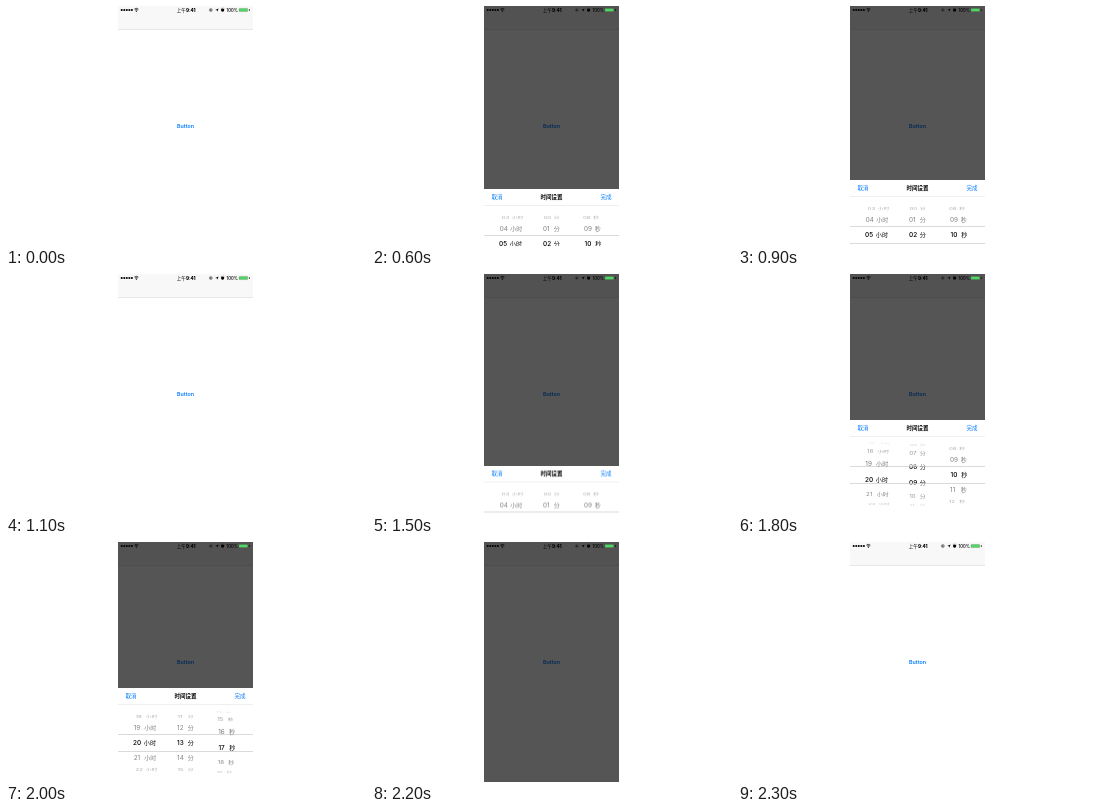
Animation, 360 px wide and 240 px high, one loop 2.4 s. Source, as an HTML page:

```html
<!DOCTYPE html>
<html lang="zh-CN">
<head>
<meta charset="utf-8">
<title>时间设置</title>
<style>
html, body { margin: 0; width: 100%; height: 100%; overflow: hidden; background: #fff; }
svg { display: block; width: 360px; height: 240px; }
text { font-family: Inter, "Noto Sans CJK SC", "Noto Sans CJK", sans-serif; }
.blue { fill: #007aff; }
.mid { text-anchor: middle; }
.bar { font-size: 5.5px; }
#dim { animation: dim 2400ms step-end infinite; }
#sheet { animation: slide 2400ms step-end infinite; }

@keyframes dim {
  0% { opacity: 0; }
  25% { opacity: .667; }
  45.8333% { opacity: 0; }
  62.5% { opacity: .667; }
  95.8333% { opacity: 0; }
}
@keyframes slide {
  0% { transform: translateY(240px); }
  25% { transform: translateY(183px); }
  29.1667% { transform: translateY(149px); }
  33.3333% { transform: translateY(146px); }
  37.5% { transform: translateY(174px); }
  41.6667% { transform: translateY(240px); }
  62.5% { transform: translateY(191.5px); }
  66.6667% { transform: translateY(150px); }
  70.8333% { transform: translateY(146px); }
  87.5% { transform: translateY(180px); }
  91.6667% { transform: translateY(240px); }
}
</style>
</head>
<body>
<svg viewBox="0 0 360 240">
  <defs>
    <clipPath id="screen"><rect x="112" width="135" height="240"/></clipPath>
    <clipPath id="band"><rect x="112" y="46.5" width="135" height="17"/></clipPath>
    <clipPath id="rest"><path d="M112 17h135v29.5h-135zM112 63.5h135v31h-135z"/></clipPath>
  </defs>
  <g clip-path="url(#screen)">
    <rect x="112" width="135" height="23" fill="#f8f8f8"/>
    <rect x="112" y="23" width="135" height=".5" fill="#d0d0d0"/>
    <text class="blue mid" x="179.5" y="122" font-size="5.3" font-weight="600">Button</text>
    <rect id="dim" x="112" width="135" height="240"/>

    <g id="status">
      <path d="M115.7 4h10.4" fill="none" stroke="#000" stroke-width="2.1" stroke-linecap="round" stroke-dasharray="0 2.55"/>
      <path d="M128.4 3.2q2-1.7 4 0M129.2 4.2q1.2-1 2.4 0" fill="none" stroke="#000" stroke-width=".8"/>
      <circle cx="130.4" cy="5.2" r=".6"/>
      <text x="170.7" y="5.7" font-size="4.6" font-weight="500">上午<tspan font-weight="800">9:41</tspan></text>
      <circle cx="204.8" cy="4" r="1.5" fill="none" stroke="#333" stroke-width=".5"/>
      <rect x="204.1" y="3.5" width="1.4" height="1.1"/>
      <path d="M212.6 2.4l-1.4 3.4-.3-1.6-1.7-.3z"/>
      <circle cx="216.6" cy="4.1" r="1.6"/>
      <path d="M214.9 2.8l.8-.7M218.3 2.8l-.8-.7" stroke="#000" stroke-width=".6"/>
      <text x="220.6" y="5.6" font-size="4.2" font-weight="500">100%</text>
      <rect x="233" y="2.4" width="8.7" height="3.2" rx=".5" fill="#4cd964" stroke="#555" stroke-width=".25"/>
      <rect x="242.9" y="3.2" width=".9" height="1.6" rx=".4"/>
    </g>

    <g id="sheet">
      <rect x="112" width="135" height="95" fill="#fff"/>
      <text class="blue bar" x="119.5" y="10">取消</text>
      <text class="bar mid" x="179.5" y="10" font-weight="700">时间设置</text>
      <text class="blue bar" x="228.5" y="10">完成</text>
      <rect x="112" y="16" width="135" height=".5" fill="#dedede"/>
      <g id="outer" clip-path="url(#rest)"></g>
      <g id="inner" clip-path="url(#band)" font-weight="500"></g>
      <path d="M112 46.5h135M112 63.5h135" stroke="#b4b4b4" stroke-width=".5"/>
    </g>
  </g>
</svg>
<script>
const LOOP = 2400, STEP = 100;
const MID_X = 179.5, MID_Y = 55, RADIUS = 32, ROW_ANGLE = 28 * Math.PI / 180;

// turns: wheel position at each step from 1700 ms on
const wheels = [
  { x: 127, unit: "小时", size: 24, rest: 5, turns: [13, 19.71, 20, 20] },
  { x: 171, unit: "分", size: 60, rest: 2, turns: [2.6, 8.5, 12.6, 13] },
  { x: 212.5, unit: "秒", size: 60, rest: 10, turns: [10, 10, 12.4, 16.7] }
];

function add(parent, tag, attrs) {
  const el = document.createElementNS("http://www.w3.org/2000/svg", tag);
  for (const key in attrs) el.setAttribute(key, attrs[key]);
  return parent.appendChild(el);
}

function makeRow(layer, wheel) {
  const group = add(layer, "g", {});
  const x = wheel.x - MID_X;
  const digits = add(group, "text", { x, y: 2.3, "font-size": 6.4 });
  add(group, "text", { x: x + 10.8, y: 2.3, "font-size": 6.1 }).textContent = wheel.unit;
  return { group, digits };
}

const layers = ["outer", "inner"].map(id => document.getElementById(id));
for (const wheel of wheels) {
  wheel.rows = layers.map(layer => Array.from({ length: 7 }, () => makeRow(layer, wheel)));
}

function turnWheel(wheel, turn) {
  const first = Math.round(turn) - 3;
  wheel.rows.forEach((rows, layer) => rows.forEach(({ group, digits }, i) => {
    const angle = (first + i - turn) * ROW_ANGLE;
    const cos = Math.cos(angle);
    const hidden = Math.abs(angle) > 1.45;
    group.setAttribute("display", hidden ? "none" : "inline");
    if (hidden) return;
    const scale = 1 - 0.11 * (1 - cos);
    const y = MID_Y + RADIUS * Math.sin(angle);
    group.setAttribute("transform", `translate(${MID_X} ${y}) scale(${scale} ${scale * cos})`);
    group.setAttribute("opacity", layer ? 1 : 0.58 * cos);
    const value = (first + i + wheel.size) % wheel.size;
    digits.textContent = String(value).padStart(2, "0");
  }));
}

const start = performance.now();
let shown = -1;

function draw() {
  const step = Math.floor(Math.max(0, performance.now() - start) % LOOP / STEP);
  if (step !== shown) {
    shown = step;
    for (const wheel of wheels) {
      const i = Math.min(step - 17, wheel.turns.length - 1);
      turnWheel(wheel, i < 0 ? wheel.rest : wheel.turns[i]);
    }
  }
  requestAnimationFrame(draw);
}
draw();
</script>
</body>
</html>
```
